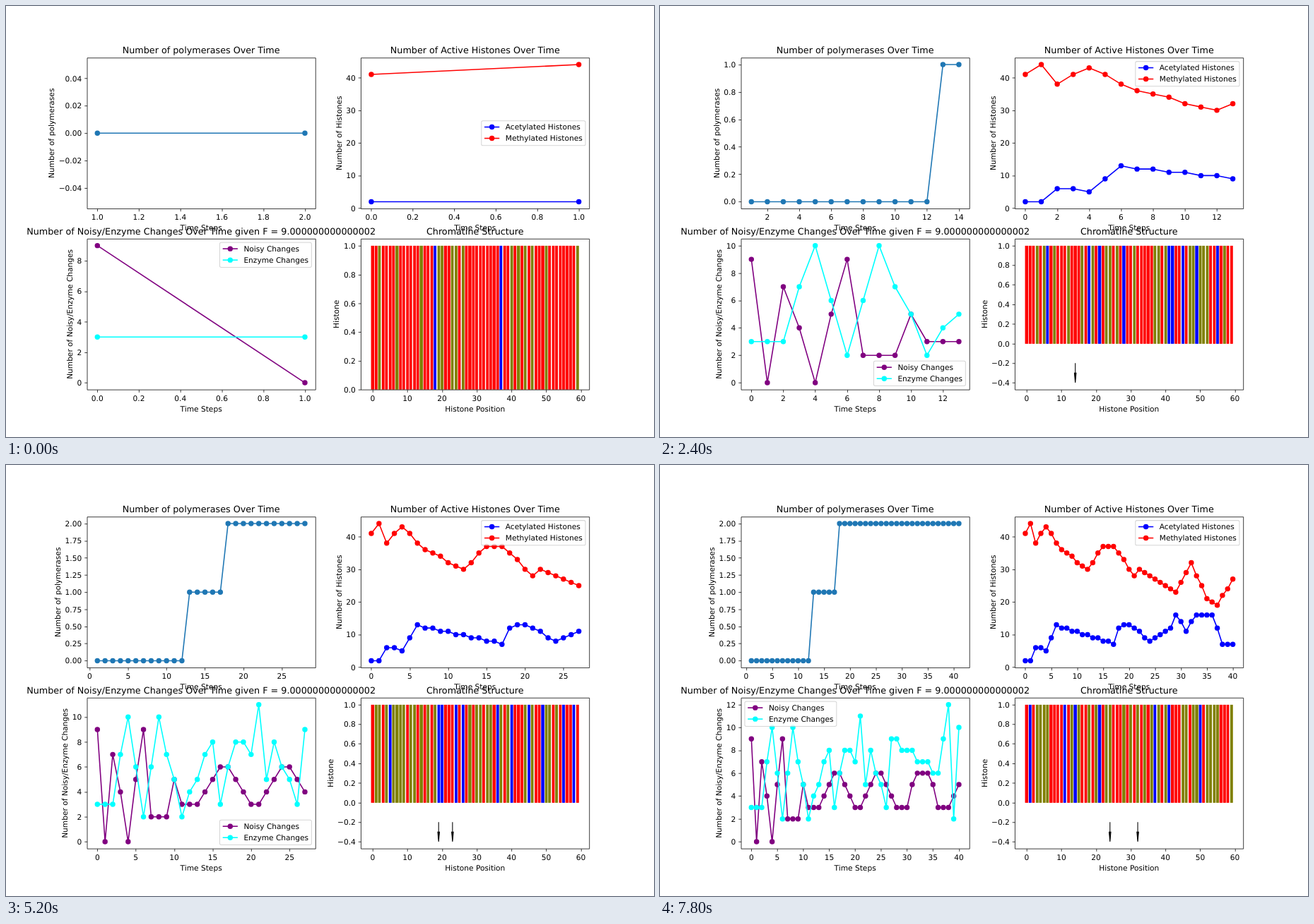
Recreate the animation shown at these times as an HTML page. Size 917 px wide and 611 px high, loop 8 s.

```html
<!DOCTYPE html>
<html lang="en">
<head>
<meta charset="utf-8">
<title>Histone simulation</title>
<style>
  html, body { margin: 0; width: 100%; height: 100%; overflow: hidden; background: #fff; }
  svg { display: block; width: 100%; height: 100%; }
  text { font: 10px "DejaVu Sans", sans-serif; text-rendering: geometricPrecision; }
  .title { font-size: 12px; }
  .mid { text-anchor: middle; }
  .end { text-anchor: end; }
</style>
</head>
<body>
<svg id="figure" viewBox="0 0 864 576" preserveAspectRatio="none"></svg>
<script>
const STEP_MS = 200, STEPS = 40, BARS = 60;
const W = 304.36, H = 201.6;                        // size of each panel, in points
const LEFT = 108, RIGHT = 473.24, TOP = 69.12, BOTTOM = 311.04;
const PIXEL = 0.72;                                 // grid that axes and bars snap to

const hash = (a, b) => { const v = Math.sin(a * 12.9898 + b * 78.233) * 43758.5453; return v - Math.floor(v); };
const snap = v => Math.round(v / PIXEL) * PIXEL;

// Whole-number value at step t on the straight lines through [step, value] turning points.
function along(knots, t) {
  const k = Math.max(1, knots.findIndex(p => p[0] >= t));
  const [[t0, v0], [t1, v1]] = [knots[k - 1], knots[k]];
  return Math.round(v0 + (v1 - v0) * (t - t0) / (t1 - t0));
}

const methylatedTurns = [[0, 41], [1, 44], [2, 38], [4, 43], [7, 36], [12, 30], [15, 37], [17, 37],
  [21, 28], [22, 30], [29, 23], [32, 32], [35, 21], [37, 19], [40, 27]];
const acetylatedTurns = [[0, 2], [1, 2], [2, 6], [4, 5], [6, 13], [17, 7], [18, 12], [20, 13],
  [24, 8], [28, 12], [29, 16], [31, 11], [33, 16], [36, 16], [38, 7], [40, 7]];
const noisyTurns = [[0, 9], [1, 0], [2, 7], [4, 0], [6, 9], [7, 2], [9, 2]];
const enzymeTurns = [[0, 3], [2, 3], [4, 10], [6, 2], [8, 10], [11, 2], [15, 8], [16, 3], [18, 8], [20, 7],
  [21, 11], [22, 5], [23, 8], [26, 3], [27, 9], [36, 6], [38, 12], [39, 2], [40, 10]];

const methylated = t => along(methylatedTurns, t);
const acetylated = t => along(acetylatedTurns, t);
const enzyme = t => along(enzymeTurns, t);
// Wild at first, then a steady swing.
const noisy = t => t < 10 ? along(noisyTurns, t)
  : Math.round(4.5 + 1.8 * Math.cos(2 * Math.PI * (t - 16.4) / 8.3));
const polymerases = x => (x >= 13) + (x >= 18);
const walkers = [n => Math.round(17 + 0.67 * (n - 19)), n => Math.floor(16.6 + 0.36 * (n - 19))];

const label = (x, y, str, cls, extra = "") => `<text x="${x}" y="${y}" class="${cls}" ${extra}>${str}</text>`;
const padded = (lo, hi) => [lo - (hi - lo) * 0.05, hi + (hi - lo) * 0.05];
const limits = values => padded(Math.min(...values), Math.max(...values));
const textWidth = str => [...str].reduce((w, c) => w + (c === "." ? 3.18 : c === "−" ? 8.38 : 6.36), 0);

function ticks([lo, hi]) {
  const raw = (hi - lo) / 9, mag = 10 ** Math.floor(Math.log10(raw));
  const step = [1, 2, 2.5, 5, 10].map(s => s * mag).find(s => s >= raw - 1e-9);
  let digits = 0;
  while (Math.abs(step * 10 ** digits - Math.round(step * 10 ** digits)) > 1e-6) digits++;
  const list = [];
  for (let i = Math.ceil(lo / step - 1e-9); i <= hi / step + 1e-9; i++)
    list.push({ value: i * step, str: (i * step).toFixed(digits).replace("-", "−") });
  return list;
}

// Each panel gives its scales and wraps its content with axes and labels.
function panel(left, top, xlim, ylim) {
  const X = v => left + (v - xlim[0]) / (xlim[1] - xlim[0]) * W;
  const Y = v => top + H - (v - ylim[0]) / (ylim[1] - ylim[0]) * H;
  const base = top + H, edge = v => snap(v) + PIXEL / 2;
  const draw = (content, title, xName, yName) => {
    const xt = ticks(xlim), yt = ticks(ylim);
    const yx = left - 13.16 - Math.max(...yt.map(t => textWidth(t.str))), yy = top + H / 2;
    const marks = xt.map(t => `M${edge(X(t.value))} ${edge(base)}v3.5`)
      .concat(yt.map(t => `M${edge(left)} ${edge(Y(t.value))}h-3.5`));
    const frame = `M${edge(left)} ${edge(top)}H${edge(left + W)}V${edge(base)}H${edge(left)}z`;
    return content.body
      + `<path d="${frame}${marks.join("")}" fill="none" stroke="#000" stroke-width="${PIXEL}"/>`
      + xt.map(t => label(X(t.value), base + 14.92, t.str, "mid")).join("")
      + yt.map(t => label(left - 7, Y(t.value) + 3.8, t.str, "end")).join("")
      + label(left + W / 2, base + 29, xName, "mid")
      + label(yx, yy, yName, "mid", `transform="rotate(-90 ${yx} ${yy})"`)
      + label(left + W / 2, top - 6, title, "title mid")
      + (content.legend || "");
  };
  return { left, top, X, Y, draw };
}

const dot = ([x, y], color) => `<circle cx="${x}" cy="${y}" r="3.5" fill="${color}"/>`;
const curve = (points, color) =>
  `<polyline points="${points.join(" ")}" fill="none" stroke="${color}" stroke-width="1.5" stroke-linejoin="round"/>`
  + points.map(p => dot(p, color)).join("");

function segmentHits(p, q, box) {
  let t0 = 0, t1 = 1;
  for (const k of [0, 1]) {
    const d = q[k] - p[k], lo = box.min[k], hi = box.max[k];
    if (!d) { if (p[k] < lo || p[k] > hi) return false; continue; }
    const u = (lo - p[k]) / d, v = (hi - p[k]) / d;
    t0 = Math.max(t0, Math.min(u, v));
    t1 = Math.min(t1, Math.max(u, v));
  }
  return t0 <= t1;
}

// Puts the legend at the first spot that covers the fewest points and lines.
function legend(axes, series, nameWidth) {
  const w = 36 + nameWidth, row = 15.08, h = 18.08 + row;
  const spots = [[1, 0], [0, 0], [0, 1], [1, 1], [1, .5], [0, .5], [.5, 1], [.5, 0], [.5, .5]];
  let best, least = Infinity;
  for (const [fx, fy] of spots) {
    const x = axes.left + 5 + fx * (W - 10 - w), y = axes.top + 5 + fy * (H - 10 - h);
    const box = { min: [x, y], max: [x + w, y + h] };
    const inside = p => p.every((c, k) => c > box.min[k] && c < box.max[k]);
    let cost = 0;
    for (const { points } of series)
      cost += points.filter(inside).length + points.some((p, i) => i && segmentHits(points[i - 1], p, box));
    if (cost < least) { least = cost; best = [x, y]; }
  }
  const [x, y] = best;
  return `<rect x="${x}" y="${y}" width="${w}" height="${h}" rx="2" fill="#fff" stroke="#ccc" opacity=".8"/>`
    + series.map(({ color, name }, i) => {
      const cy = y + 8.4 + i * row;
      return `<path d="M${x + 4} ${cy}h20" stroke="${color}" stroke-width="1.5"/>`
        + dot([x + 14, cy], color) + label(x + 32, cy + 3.5, name, "");
    }).join("");
}

function pairPanel(left, top, n, sources, nameWidth, title, yName) {
  const data = sources.map(s => Array.from({ length: n }, (_, t) => s.value(t)));
  const axes = panel(left, top, padded(0, n - 1), limits(data.flat()));
  const series = sources.map((s, k) => ({ ...s, points: data[k].map((v, t) => [axes.X(t), axes.Y(v)]) }));
  return axes.draw({
    body: series.map(s => curve(s.points, s.color)).join(""),
    legend: legend(axes, series, nameWidth)
  }, title, "Time Steps", yName);
}

function polymerasePanel(n) {
  const xs = Array.from({ length: n }, (_, i) => i + 1), most = polymerases(n);
  const axes = panel(LEFT, TOP, padded(1, n), most ? padded(0, most) : [-0.055, 0.055]);
  const body = curve(xs.map(x => [axes.X(x), axes.Y(polymerases(x))]), "#1f77b4");
  return axes.draw({ body }, "Number of polymerases Over Time", "Time Steps", "Number of polymerases");
}

// Bars drift between states; the plotted counts decide how many are red and blue.
function barColors(n) {
  const score = i => hash(i, 1) + 0.4 * Math.sin(n * (0.1 + 0.3 * hash(i, 2)) + 2 * Math.PI * hash(i, 3));
  const order = Array.from({ length: BARS }, (_, i) => i).sort((a, b) => score(a) - score(b));
  const colors = [];
  order.forEach((bar, rank) => {
    colors[bar] = rank < methylated(n - 1) ? "#f00" : rank >= BARS - acetylated(n - 1) ? "#00f" : "#808000";
  });
  return colors;
}

function chromatinPanel(n) {
  const count = polymerases(n);
  const axes = panel(RIGHT, BOTTOM, padded(-0.4, BARS - 0.6), count ? padded(-0.4, 1) : [0, 1.05]);
  const { X, Y } = axes, top = snap(Y(1)), height = snap(Y(0)) - top;
  let body = barColors(n).map((color, i) => {
    const x = snap(X(i - 0.4));
    return `<rect x="${x}" y="${top}" width="${snap(X(i + 0.4)) - x}" height="${height}" fill="${color}"/>`;
  }).join("");
  for (const walker of walkers.slice(0, count)) {
    const p = walker(n), neck = Y(-0.3);
    body += `<path d="M${X(p)} ${Y(-0.2)}V${neck}H${X(p - 0.25)}L${X(p)} ${Y(-0.4)}L${X(p + 0.25)} ${neck}H${X(p)}" stroke="#000"/>`;
  }
  return axes.draw({ body }, "Chromatine Structure", "Histone Position", "Histone");
}

const histoneSeries = [
  { value: acetylated, color: "#00f", name: "Acetylated Histones" },
  { value: methylated, color: "#f00", name: "Methylated Histones" }
];
const changeSeries = [
  { value: noisy, color: "#800080", name: "Noisy Changes" },
  { value: enzyme, color: "#0ff", name: "Enzyme Changes" }
];

const figure = document.getElementById("figure");
let shown = -1;
function render(now) {
  const step = Math.floor(now / STEP_MS) % STEPS;
  if (step !== shown) {
    shown = step;
    const n = step + 2;
    figure.innerHTML = polymerasePanel(n)
      + pairPanel(RIGHT, TOP, n, histoneSeries, 102.7, "Number of Active Histones Over Time", "Number of Histones")
      + pairPanel(LEFT, BOTTOM, n, changeSeries, 86.4,
        "Number of Noisy/Enzyme Changes Over Time given F = 9.000000000000002", "Number of Noisy/Enzyme Changes")
      + chromatinPanel(n);
  }
  requestAnimationFrame(render);
}
render(performance.now());
</script>
</body>
</html>
```
